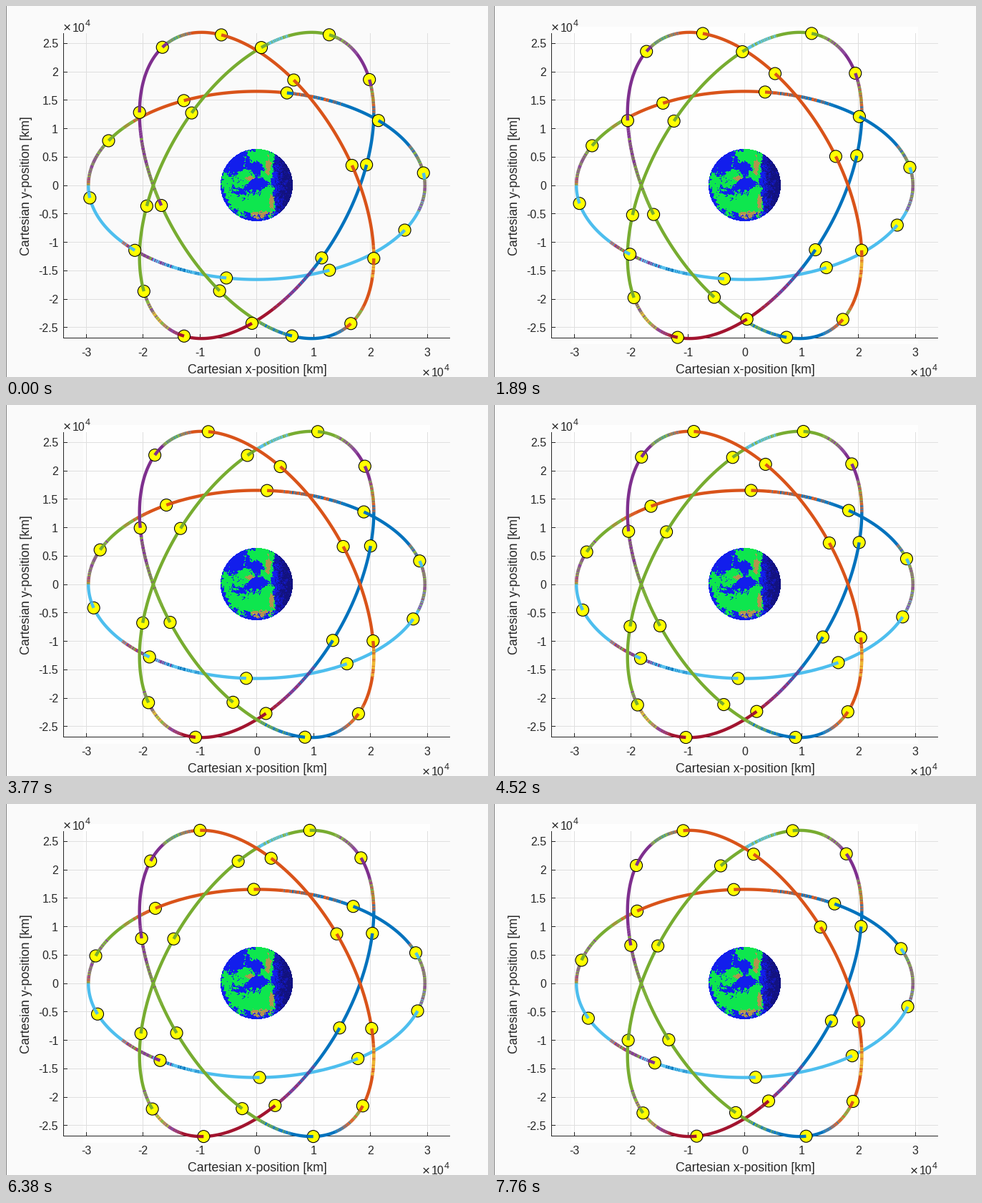
A matplotlib script that plays this animation: 674 px wide and 519 px high, repeating every 8000 ms.

```python
import numpy as np
import matplotlib.pyplot as plt
from matplotlib.animation import FuncAnimation
from matplotlib.collections import EllipseCollection, LineCollection
from matplotlib.patches import Rectangle

W, H, DPI = 674, 519, 64
PX = 72 / DPI                     # points per pixel
CX, CY, UNIT = 350, 250.5, 79.5   # origin as a pixel index, pixels per 10^4 km
A, B = 2.96 * UNIT, 2.96 * UNIT * np.cos(np.radians(56))
FRAMES, INTERVAL = 200, 40
START, STEP, STEP_MS = 7.63, 0.2272, 125.1
INK, PAPER, PATCH, GRID = "#262626", "#fafafa", "#fefefe", "#dfdfdf"

COLORS = dict(b="#0072bd", o="#d95319", y="#edb120", p="#7e2f8e",
              g="#77ac30", c="#4dbeee", r="#a2142f")

# tilt of each plane -> runs of (start angle, colours passed through)
PLANES = {
    0: [(-16, "cpgpgb"), (25, "b"), (58, "bo"), (82, "o"), (130, "og"),
        (143, "g"), (152, "gpgpo"), (180, "c"), (217, "copgp"),
        (232, "pcbc"), (250, "c")],
    60: [(-44, "bogp"), (-29, "p"), (-13, "pg"), (4, "g"), (30, "gcg"),
         (46, "g"), (152, "gpgyp"), (178, "pr"), (186, "r"), (234, "rpb"),
         (256, "b")],
    120: [(-12, "obgp"), (7, "p"), (50, "pg"), (80, "g"), (134, "gb"),
          (151, "b"), (176, "bo"), (187, "ogo"), (200, "o"), (215, "oyo"),
          (229, "o")],
}

rng = np.random.default_rng(7)


def orbit(tilt, deg):
    """Pixel positions on a plane's projected ellipse."""
    u, t = np.radians(deg), np.radians(tilt)
    m, n = A * np.cos(u), B * np.sin(u)
    x = m * np.cos(t) - n * np.sin(t)
    y = m * np.sin(t) + n * np.cos(t)
    return np.stack([CX + x, CY - y], axis=-1)


def color_at(tilt, deg):
    runs = PLANES[tilt]
    first = runs[0][0]
    deg = (deg - first) % 360 + first
    return COLORS[[mix for start, mix in runs if start <= deg][-1][0]]


def tracks():
    """Solid runs, and fine-grained runs that drift through their colours."""
    segs, cols = [], []
    for tilt, runs in PLANES.items():
        ends = [r[0] for r in runs[1:]] + [runs[0][0] + 360]
        for (start, mix), end in zip(runs, ends):
            size = 0.22 if len(mix) > 1 else end - start
            for u in np.arange(start, end - 1e-6, size):
                stop = min(u + size, end) + 0.08
                segs.append(orbit(tilt, np.linspace(u, stop, 2 + int(size))))
                t = 0.5 * (u - start) / (end - start) + 0.5 * rng.random()
                cols.append(COLORS[mix[int(t * len(mix))]])
    return segs, cols


def rough(power):
    """Smoothed noise of unit spread; lower powers are grainier."""
    f = np.fft.fftfreq(101)
    decay = (0.03 + np.hypot(f[:, None], f)) ** power
    n = np.fft.ifft2(np.fft.fft2(rng.normal(size=(101, 101))) / decay).real
    return (n - n.mean()) / n.std()


def globe():
    y, x = np.mgrid[-50:51, -50:51]

    def field(blobs):
        return sum(w * np.exp(-((x - bx) / rx) ** 2 - ((y - by) / ry) ** 2)
                   for bx, by, rx, ry, w in blobs)

    land = field([(6, -42, 24, 12, 1.1), (17, -20, 9, 22, 1),
                  (-16, -10, 18, 12, .9), (-42, 0, 9, 20, .9),
                  (0, 28, 30, 16, 1.2), (16, 14, 10, 22, .8),
                  (-30, 24, 10, 14, .6), (-26, -28, 14, 9, -.5),
                  (3, -2, 16, 6, -1), (0, -24, 7, 6, -.8),
                  (44, 0, 17, 70, -1.2)]) + 0.2 * rough(1.3)
    dry = field([(16, -28, 5, 16, 1), (4, 42, 18, 7, 1.1),
                 (21, 22, 4, 12, .9), (-9, -9, 8, 4, .9)]) + 0.15 * rough(1.3)
    night = x + 6 * rough(1)
    ground = land > 0.47
    img = np.zeros(x.shape + (4,), np.uint8)
    img[...] = (18, 30, 236, 255)
    img[night > 25] = (20, 22, 176, 255)
    img[night > 35] = (18, 18, 128, 255)
    img[ground] = (14, 230, 78, 255)
    img[ground & (dry > 0.6)] = (178, 148, 78, 255)
    img[ground & (dry > 1.05) & (y > 35)] = (214, 190, 158, 255)
    img[np.hypot(x, y) > 50.6] = 0
    return img


def satellites(k):
    """(tilt, angle) of all thirty at step k."""
    return [(tilt, START + STEP * k + 36 * i)
            for tilt in PLANES for i in range(10)]


def spots(k):
    return np.array([orbit(*s) for s in satellites(k)])


# the repainted area only ever grows
reach = np.array([np.abs(spots(k) - (CX, CY)).max(axis=0) + 9.3
                  for k in range(65)])
reach = np.maximum.accumulate(reach)

fig = plt.figure(figsize=(W / DPI, H / DPI), dpi=DPI, facecolor=PAPER)
ax = fig.add_axes([0, 0, 1, 1])
ax.axis("off")
ax.imshow(globe(), extent=(299.5, 400.5, 300.5, 199.5), zorder=4,
          interpolation="nearest", aspect="auto")
ax.set_xlim(-0.5, W - 0.5)
ax.set_ylim(H - 0.5, -0.5)


def bar(x0, y0, x1, y1, color=INK, z=2):
    """One-pixel line through whole pixels, both ends included."""
    x0, y0, x1, y1 = (int(np.floor(v + 0.5)) for v in (x0, y0, x1, y1))
    ax.add_patch(Rectangle((x0 - 0.5, y0 - 0.5), x1 - x0 + 1, y1 - y0 + 1,
                           fc=color, ec="none", lw=0, zorder=z, snap=False))


def label(x, y, s, size=16, **kw):
    kw = {"ha": "center", "va": "baseline", **kw}
    ax.text(x, y, s, fontsize=size * PX, family="Liberation Sans",
            color=INK, zorder=2, **kw)


def exponent(x, base):
    label(x, base + 1, "×", 19, ha="left")
    label(x + 13, base, "10", ha="left")
    label(x + 31.5, base - 8, "4", 12.8, ha="left")


patch = ax.add_patch(Rectangle((0, 0), 0, 0, fc=PATCH, ec="none", zorder=0))
LEFT, RIGHT, TOP, BOTTOM = 80, 620, 38, 464
bar(0, 0, 0, H - 1, "#858585")

for i in range(-3, 4):
    x = CX + UNIT * i
    bar(x, TOP, x, BOTTOM, GRID, 1)
    bar(x, BOTTOM - 5, x, BOTTOM)
    label(x, 490, f"{i}")
for i in range(-5, 6):
    y = CY - UNIT * i / 2
    bar(LEFT, y, RIGHT, y, GRID, 1)
    bar(LEFT, y, LEFT + 5, y)
    label(72.5, y + 6.2, f"{i / 2:g}", ha="right")
bar(LEFT, TOP, LEFT, BOTTOM)
bar(LEFT, BOTTOM, RIGHT, BOTTOM)
exponent(79, 35)
exponent(581, 517.5)
label(350.5, 514, "Cartesian x-position [km]", 17.7)
label(28, 251, "Cartesian y-position [km]", 17.7, rotation=90, va="center")

segs, cols = tracks()
ax.add_collection(LineCollection(segs, colors=cols, linewidths=4.4 * PX,
                                 zorder=3), autolim=False)
size = np.full(30, 17)
dots = ax.add_collection(
    EllipseCollection(size, size, np.zeros(30), units="xy", offsets=spots(0),
                      offset_transform=ax.transData, facecolors="#ffff00",
                      edgecolors="black", linewidths=1.1 * PX, zorder=5),
    autolim=False)
tails = ax.add_collection(LineCollection([], linewidths=4.4 * PX, zorder=6),
                          autolim=False)


def tail(tilt, deg):
    """The last few pixels of track leading into a satellite's centre."""
    u = np.radians(deg)
    span = np.degrees(9 / np.hypot(A * np.sin(u), B * np.cos(u)))
    return orbit(tilt, np.linspace(deg - span, deg, 4))


def update(i):
    k = int((i * INTERVAL + INTERVAL / 2) / STEP_MS)
    if k in (31, 61):              # two steps are skipped
        k -= 1
    sats = satellites(k)
    dots.set_offsets(spots(k))
    tails.set_segments([tail(*s) for s in sats])
    tails.set_color([color_at(*s) for s in sats])
    w, h = reach[k] if k else (0, 0)
    patch.set_bounds(CX - w, CY - h, 2 * w, 2 * h)
    return patch, dots, tails


anim = FuncAnimation(fig, update, frames=FRAMES, interval=INTERVAL,
                     init_func=lambda: update(0), repeat=True,
                     repeat_delay=0, blit=False)
plt.show()
```
